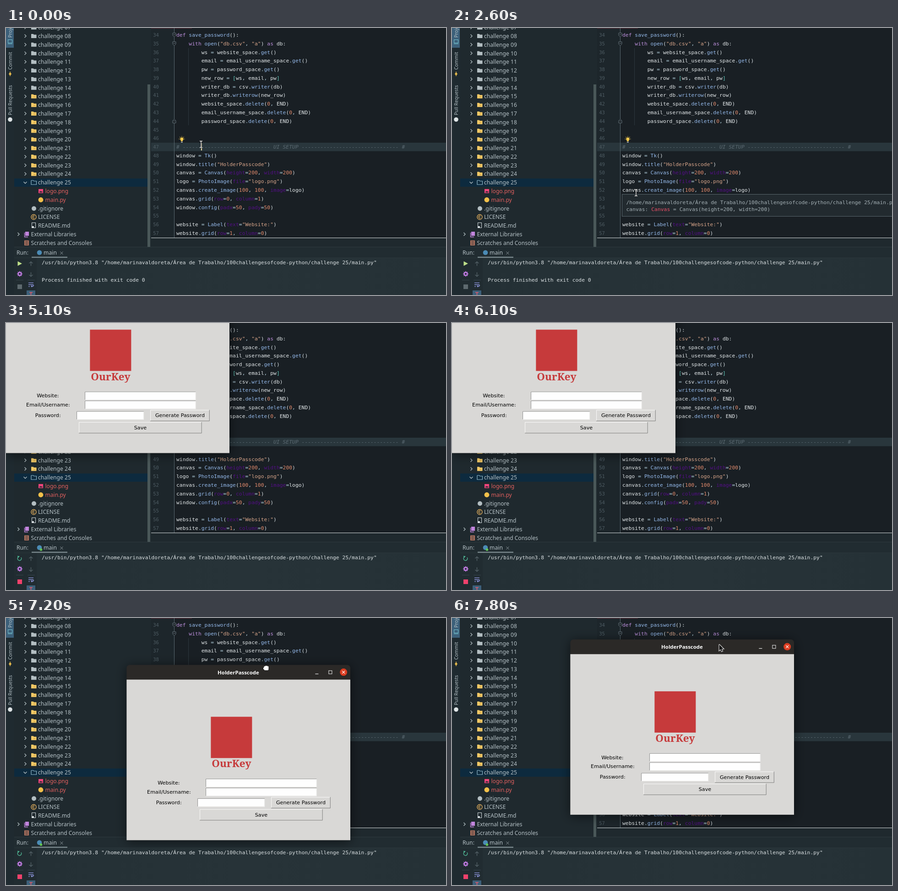
These frames come from a looping animation (961 by 582 pixels, 8 s). An HTML page with a canvas:

```html
<!DOCTYPE html>
<html lang="en">
<head>
<meta charset="utf-8">
<title>Password manager run</title>
<style>
html, body { margin: 0; width: 100%; height: 100%; overflow: hidden; background: #1f292e; }
canvas { display: block; }
</style>
</head>
<body>
<canvas id="stage" width="961" height="582"></canvas>
<script>
const ctx = document.getElementById('stage').getContext('2d');
const LOOP = 8000;
const MONO = '"DejaVu Sans Mono", monospace';
const UI = '"Noto Sans", sans-serif';
const CODE_FONT = '11.36px ' + MONO;
const CHAR = 6.84, ROW = 18.78;
const HOME = '/home/marinavaldoreta/Área de Trabalho/100challengesofcode-python/challenge 25/main.py';
const TITLE = 'HolderPasscode';

const CODE = `def save_password():
    with open("db.csv", "a") as db:
        ws = website_space.get()
        email = email_username_space.get()
        pw = password_space.get()
        new_row = [ws, email, pw]
        writer_db = csv.writer(db)
        writer_db.writerow(new_row)
        website_space.delete(0, END)
        email_username_space.delete(0, END)
        password_space.delete(0, END)


# ${'-'.repeat(28)} UI SETUP ${'-'.repeat(31)} #
window = Tk()
window.title("${TITLE}")
canvas = Canvas(height=200, width=200)
logo = PhotoImage(file="logo.png")
canvas.create_image(100, 100, image=logo)
canvas.grid(row=0, column=1)
window.config(padx=50, pady=50)

website = Label(text="Website:")
website.grid(row=1, column=0)`.split('\n');

const TOKENS = [
  [/^#.*/, '#5c6b73'],
  [/^"[^"]*"/, '#d8a58a'],
  [/^(def|with|as)\b/, '#bd8fdc'],
  [/^\d+/, '#e08a6c'],
  [/^\w+(?==)/, '#530f85'],
  [/^\w+(?=\()/, '#94b9ea'],
  [/^\w+/, '#e3e8ea'],
  [/^[[\]]/, '#63cfc0'],
  [/^[=.,]/, '#b5d3e0'],
  [/^\s+/, '#000'],
  [/^./, '#d6dee2']
];

// Stepped positions: [time, x, y, shape]
const POINTER = [
  [0, 426, 253.5, 'beam'], [1100, 405, 258, 'beam'], [1200, 335, 271, 'beam'],
  [1300, 228, 288, 'arrow'], [1400, 132, 305, 'arrow'], [1500, 91, 318, 'arrow'],
  [1600, 140, 330, 'arrow'], [1700, 245, 342, 'arrow'], [1800, 348, 353, 'beam'],
  [1900, 402, 359, 'beam'], [2700, 396, 424, 'beam'], [2900, 0, 0, ''],
  [4100, 322, 358, 'beam'], [4200, 390, 284, 'beam'], [4300, 470, 200, 'beam'],
  [4400, 565, 108, 'beam'], [4500, 668, 20, 'beam'], [4600, 0, 0, ''],
  [5600, 646, 119, 'beam'], [5700, 331, 134, 'arrow'], [5900, 324, 103, 'arrow'],
  [6100, 0, 0, ''], [7100, 452, 36, 'hand'], [7200, 568, 109, 'hand'],
  [7300, 656, 117, 'hand'], [7400, 618, 88, 'hand'], [7500, 563, 54, 'hand'],
  [7600, 723, 57, 'arrow'], [7800, 583, 57, 'arrow']
];
const WINDOW = [
  [5100, -.6, -98.5], [7000, 31.7, -47], [7100, 147, 29], [7200, 263.4, 102.3],
  [7300, 351, 110], [7400, 313, 81], [7500, 258.4, 46.8]
];
const CARET = [[0, 1], [300, 0], [1500, 1], [2200, 0], [2700, 1], [3600, 0]];

const at = (steps, t) => steps.filter(s => s[0] <= t).pop();

function rect(x, y, w, h, fill) {
  ctx.fillStyle = fill;
  ctx.fillRect(x, y, w, h);
}
function frame(x, y, w, h, stroke) {
  ctx.strokeStyle = stroke;
  ctx.lineWidth = 1;
  ctx.strokeRect(x + .5, y + .5, w - 1, h - 1);
}
function text(s, x, y, fill, font, align = 'left') {
  ctx.font = font;
  ctx.fillStyle = fill;
  ctx.textAlign = align;
  ctx.fillText(s, x, y);
}
function disc(x, y, r, fill) {
  ctx.fillStyle = fill;
  ctx.beginPath();
  ctx.arc(x, y, r, 0, 7);
  ctx.fill();
}
function ring(x, y, r, stroke, width, from = 0, to = Math.PI * 2) {
  ctx.strokeStyle = stroke;
  ctx.lineWidth = width;
  ctx.beginPath();
  ctx.arc(x, y, r, from, to);
  ctx.stroke();
}
function trace(pts, x, y) {
  ctx.beginPath();
  for (let i = 0; i < pts.length; i += 2) ctx.lineTo(x + pts[i], y + pts[i + 1]);
}
function line(pts, stroke, width = 1, x = 0, y = 0) {
  trace(pts, x, y);
  ctx.strokeStyle = stroke;
  ctx.lineWidth = width;
  ctx.stroke();
}
function poly(pts, fill, x = 0, y = 0) {
  trace(pts, x, y);
  ctx.fillStyle = fill;
  ctx.fill();
}

function codeLine(s, x, y) {
  let col = 0;
  while (col < s.length) {
    const rest = s.slice(col);
    const [re, color] = TOKENS.find(k => k[0].test(rest));
    const word = rest.match(re)[0];
    text(word, x + col * CHAR, y, color, (word[0] === '#' ? 'italic ' : '') + CODE_FONT);
    col += word.length;
  }
}

function sideways(s, x, y) {
  ctx.save();
  ctx.translate(x, y);
  ctx.rotate(-Math.PI / 2);
  text(s, 0, 0, '#b4c0c5', '10.4px ' + UI);
  ctx.restore();
}

const FOLDER = [55, -4.5, 59.5, -4.5, 61, -3, 66.5, -3, 66.5, 4.5, 55, 4.5, 55, -4.5];

function folder(y, n) {
  if (n === 25) return line(FOLDER, '#8fb9cc', 1.2, 0, y);
  poly(FOLDER, n < 15 ? '#b3bec2' : '#f2c966', 0, y);
  if (n >= 15) rect(60, y, 4, 2, '#d8aa4c');
}
function chevron(x, y, down) {
  line(down ? [-3.5, -1.5, 0, 2, 3.5, -1.5] : [-1.5, -3.5, 2, 0, -1.5, 3.5], '#aebabe', 1.4, x, y);
}

function stripe() {
  rect(0, 0, 18, 582, '#1f2a30');
  rect(0, 0, 17, 43, '#3c607a');
  sideways('Project', 13, 21);
  sideways('Commit', 13, 91);
  sideways('Pull Requests', 13, 190);
  frame(4, 25, 10, 8, '#74c3cf');
  line([4, 34.5, 14, 34.5], '#74c3cf');
  line([9, 95, 9, 105], '#e5b94c', 1.3);
  disc(9, 100, 2.6, '#e5b94c');
  disc(9, 199.5, 4.8, '#dde3e5');
}

function tree() {
  rect(18, 0, 299, 478, '#1f292e');
  const font = '12.1px ' + UI, ink = '#b7c3c8', red = '#e2605f';
  const rowY = k => 17.5 + k * ROW;
  rect(18, 328, 291, 18, '#0d2a3e');
  for (let n = 7; n <= 25; n++) {
    const y = rowY(n - 8);
    chevron(42, y, n === 25);
    folder(y, n);
    text('challenge ' + String(n).padStart(2, '0'), 70, y + 4.5, ink, font);
  }
  [['logo.png', 85.5, red], ['main.py', 85.5, red], ['.gitignore', 70, ink], ['LICENSE', 70, ink],
   ['README.md', 70, ink], ['External Libraries', 54.5, ink], ['Scratches and Consoles', 54.5, ink]]
    .forEach(([s, x, c], i) => text(s, x, rowY(18 + i) + 4.5, c, font));

  rect(71, 351, 10, 9, '#f0447c');
  poly([72.5, 358.5, 75, 355, 76.5, 357, 78, 355.5, 80, 358.5], '#1f292e');
  disc(76, 374.5, 5.4, '#f2c04a');
  disc(61, 393.5, 5, '#b3bec2');
  ring(60.5, 412, 5.5, '#f0b860', 1.3);
  ring(60.5, 412, 2.4, '#f0b860', 1.3, .8, 5.5);
  frame(56, 424, 9, 12, '#d5dcdf');
  rect(56, 432, 5, 4, '#d5dcdf');
  chevron(27, rowY(23));
  rect(42, 444, 8, 9, '#c184dc');
  line([40.5, 446, 40.5, 455.5, 48, 455.5], '#c184dc', 1.3);
  rect(40, 463, 10, 11, '#b0735f');
  for (let y = 465; y < 473; y += 3) rect(42, y, 6, 1, '#1f292e');
  rect(309, 123, 6, 354, '#4a5859');
}

function foldMark(y, up) {
  const s = up ? -1 : 1;
  const p = [-3.5, -4 * s, 3.5, -4 * s, 3.5, 1 * s, 0, 4.5 * s, -3.5, 1 * s, -3.5, -4 * s];
  poly(p, '#191f24', 367.5, y);
  line(p, '#64727a', 1, 367.5, y);
  line([-2, 0, 2, 0], '#64727a', 1, 367.5, y - .5);
}

function bulb() {
  disc(384, 242, 3.6, '#f5c94c');
  rect(382, 245, 4, 2, '#f5c94c');
  rect(382, 248, 4, 1.5, '#c9d0d2');
  for (let i = 0; i < 5; i++) {
    const a = Math.PI * (1 + i / 4), c = Math.cos(a), s = Math.sin(a);
    line([384 + c * 4.8, 242 + s * 4.8, 384 + c * 6.3, 242 + s * 6.3], '#f5c94c', 1.2);
  }
}

function editor(t) {
  rect(317, 0, 644, 457, '#191f24');
  rect(317, 0, 50, 457, '#1d262b');
  rect(317, 250, 644, 18.5, '#29363c');
  rect(317, 0, 89, 1, '#5e303c');
  rect(367, 0, 1, 457, '#596970');
  rect(398, 44, 1, 168, '#2d383e');
  CODE.forEach((s, i) => {
    const y = 15 + i * ROW;
    text(34 + i, 334, y + 4, '#4d5b62', '10.7px ' + MONO, 'right');
    codeLine(s, 372, y + 4);
  });
  foldMark(15);
  foldMark(34);
  foldMark(203, true);
  rect(317, 457, 644, 21, '#1f292e');
  rect(317, 457, 644, 1, '#d4dadb');
  if (t < 2900) bulb();
  if (at(CARET, t)[1]) rect(426, 251, 2, 16, '#e8d9a0');
}

function tooltip() {
  rect(371, 362, 600, 49, '#222a2f');
  frame(371, 362, 600, 49, '#59666c');
  const ink = '#a4b0b5';
  text(HOME, 380.5, 383.5, ink, CODE_FONT);
  text('canvas:', 380.5, 398.5, ink, CODE_FONT);
  text('Canvas', 380.5 + 8 * CHAR, 398.5, '#ec5068', CODE_FONT);
  text('= Canvas(height=200, width=200)', 380.5 + 15 * CHAR, 398.5, ink, CODE_FONT);
}

function arrowIcon(x, y, dir) {
  line([x, y - 4.5, x, y + 4.5], '#56646a', 1.3);
  line([x - 4, y + dir, x, y + dir * 4.5, x + 4, y + dir], '#56646a', 1.3);
}

function runPanel(t) {
  const running = t >= 3000;
  rect(18, 478, 943, 104, '#212c31');
  rect(18, 477, 943, 1, '#2e3a3f');
  const shade = ctx.createLinearGradient(67, 0, 961, 0);
  shade.addColorStop(0, '#243035');
  shade.addColorStop(.5, '#273338');
  shade.addColorStop(1, '#253136');
  rect(67, 501, 894, 81, shade);
  rect(18, 500.5, 943, 1, '#2c383d');
  text('Run:', 23, 494, '#b7c3c8', '12.2px ' + UI);
  text('main', 82, 494, '#b7c3c8', '12.2px ' + UI);
  disc(73, 489.5, 5.3, '#4b8bb5');
  if (running) disc(76.5, 494, 2.8, '#62c554');
  line([118.5, 487.5, 124.5, 493.5], '#95a2a7');
  line([124.5, 487.5, 118.5, 493.5], '#95a2a7');
  rect(56, 498.5, 78, 2.5, '#77858a');

  if (t >= 3200) {
    ring(29.5, 513.5, 4.2, '#4fb795', 1.5, -.6, 4.2);
    poly([25, 507.5, 30, 508.5, 26, 512], '#4fb795');
  } else {
    poly([25.5, 508.5, 35, 513.5, 25.5, 518.5], '#bfe08a');
  }
  ring(30, 536, 3.2, '#c17be2', 2.3);
  for (let i = 0; i < 8; i++) {
    const a = i * Math.PI / 4, c = Math.cos(a), s = Math.sin(a);
    line([30 + c * 3.5, 536 + s * 3.5, 30 + c * 5.8, 536 + s * 5.8], '#c17be2', 2);
  }
  rect(22, 549, 16, 1, '#35434a');
  rect(25, 559, 10, 10, running ? '#f0416b' : '#5d696e');
  arrowIcon(54.5, 514, -1);
  arrowIcon(54.5, 537, 1);
  rect(47, 549, 16, 1, '#35434a');
  line([49, 555.5, 60, 555.5], '#8e96dd', 1.3);
  line([49, 559.5, 59, 559.5, 60.5, 561, 59, 563, 55.5, 563], '#8e96dd', 1.3);
  line([49, 563.5, 52, 563.5], '#8e96dd', 1.3);
  poly([57, 560.5, 57, 565.5, 54, 563], '#8e96dd');
  rect(45, 572, 19, 10, '#3c607a');
  line([51, 576.5, 58, 576.5], '#e85a6c', 1.4);
  line([54.5, 576, 54.5, 582], '#e85a6c', 1.4);

  const ink = '#dce2e4';
  text('/usr/bin/python3.8 "' + HOME + '"', 78, 515, ink, CODE_FONT);
  if (t < 2900) text('Process finished with exit code 0', 78, 553, ink, CODE_FONT);
}

function entry(x, y, w) {
  const h = 18.3;
  rect(x, y, w, h, '#fefefe');
  line([x + .5, y + h - .5, x + .5, y + .5, x + w, y + .5], '#8c8c8a');
  line([x + 1, y + h - .5, x + w - .5, y + h - .5, x + w - .5, y + 1], '#ecebe9');
}
function button(s, x, y, w, font) {
  const h = 24.6;
  rect(x, y, w, h, '#d9d8d6');
  line([x + .5, y + h - .5, x + .5, y + .5, x + w, y + .5], '#fbfbfa');
  line([x, y + h - .5, x + w - .5, y + h - .5, x + w - .5, y], '#7f7f7d');
  text(s, x + w / 2, y + 16, '#000', font, 'center');
}

function appWindow(x, y) {
  const font = '11.2px "DejaVu Sans", sans-serif';
  const w = 488.6, h = 382;
  ctx.save();
  ctx.translate(x, y);
  ctx.shadowColor = 'rgba(0,0,0,.55)';
  ctx.shadowBlur = 24;
  ctx.shadowOffsetY = 3;
  ctx.fillStyle = '#2b2927';
  ctx.beginPath();
  ctx.roundRect(0, 0, w, h, [7, 7, 0, 0]);
  ctx.fill();
  ctx.shadowColor = 'transparent';
  rect(0, 32, w, h - 32, '#d9d8d6');

  text(TITLE, 244, 20.5, '#fff', 'bold 11.4px ' + UI, 'center');
  rect(412, 19, 7, 1.2, '#eee');
  frame(441, 12, 8, 8, '#eee');
  disc(473.8, 15.8, 8, '#dc3c20');
  line([470.8, 12.8, 476.8, 18.8], '#fff', 1.2);
  line([476.8, 12.8, 470.8, 18.8], '#fff', 1.2);

  rect(184, 113, 90, 90, '#c63a3b');
  text('OurKey', 229, 223, '#c63a3b', 'bold 22.5px "Noto Serif", serif', 'center');

  text('Website:', 92, 260.7, '#000', font, 'center');
  text('Email/Username:', 92.5, 280.5, '#000', font, 'center');
  text('Password:', 92.3, 303.6, '#000', font, 'center');
  entry(172.7, 248, 242.4);
  entry(172.7, 267.7, 242.4);
  entry(154.7, 290.8, 147);
  button('Generate Password', 315.7, 287.9, 129.7, font);
  button('Save', 159.7, 314.4, 268.6, font);
  ctx.restore();
}

const SHAPES = {
  beam(x, y) {
    const p = [-3, -7, -1, -7, 0, -6, 1, -7, 3, -7];
    const draw = (c, w) => {
      line(p, c, w, x, y);
      line([0, -6, 0, 6], c, w, x, y);
      line(p.map((v, i) => i % 2 ? -v : v), c, w, x, y);
    };
    draw('#111', 2.6);
    draw('#f4f4f4', 1.3);
  },
  arrow(x, y) {
    const p = [.5, .5, .5, 14, 3.6, 11.2, 5.7, 16, 7.9, 15, 5.8, 10.4, 10, 10.2, .5, .5];
    line(p, '#f2f2f2', 2, x, y);
    poly(p, '#161616', x, y);
  },
  hand(x, y) {
    ctx.beginPath();
    ctx.roundRect(x - 4.5, y - 2, 10, 7, 2.5);
    for (let i = 0; i < 4; i++) ctx.roundRect(x - 4.5 + i * 2.5, y - (i % 3 ? 5 : 4), 2.5, 5, 1.2);
    ctx.roundRect(x - 6, y - 1, 3, 4, 1.2);
    ctx.strokeStyle = '#111';
    ctx.lineWidth = 1.5;
    ctx.stroke();
    ctx.fillStyle = '#fff';
    ctx.fill();
  }
};

function render(now) {
  const t = now % LOOP;
  tree();
  stripe();
  editor(t);
  if (t >= 2600 && t < 2900) tooltip();
  runPanel(t);
  const win = at(WINDOW, t);
  if (win) appWindow(win[1], win[2]);
  const [, x, y, shape] = at(POINTER, t);
  if (shape) SHAPES[shape](x, y);
}

const start = performance.now();
(function tick() {
  render(Math.max(0, performance.now() - start));
  requestAnimationFrame(tick);
})();
</script>
</body>
</html>
```
